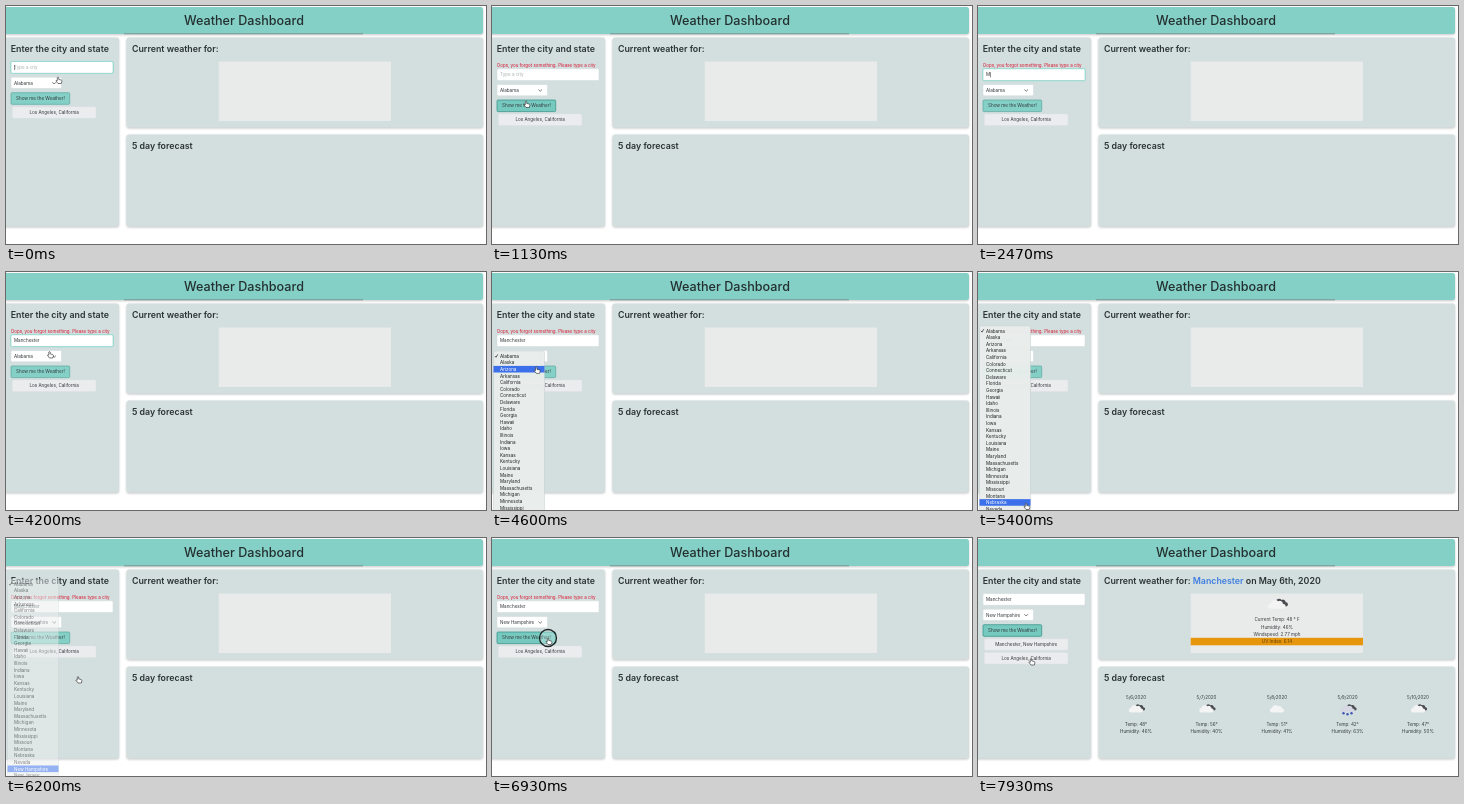
These frames come from a looping animation (480x238 px, 8 s). An HTML page:

```html
<!DOCTYPE html>
<html lang="en">
<head>
<meta charset="utf-8">
<title>Weather Dashboard</title>
<style>
  html, body { margin: 0; width: 100%; height: 100%; overflow: hidden; background: #fff; }
  svg { display: block; width: 100vw; height: 100vh; }
  text { font: 4.55px Inter, "Open Sans", sans-serif; fill: #33383b; white-space: pre; }
  .h1 { font-size: 12.6px; font-weight: 500; fill: #24302f; }
  .h3 { font-size: 8.8px; font-weight: 600; fill: #2a3235; }
  .mid { text-anchor: middle; }
  .panel { fill: #d3dfde; filter: drop-shadow(0 1px 1.2px rgba(0, 0, 0, .22)); }
  .item { fill: #ebecee; stroke: #dcdfe1; stroke-width: .4; }
  .box { fill: #fff; stroke: #cfd6d8; stroke-width: .5; }
</style>
</head>
<body>
<svg id="stage" viewBox="0 0 480 238" preserveAspectRatio="none"></svg>
<script>
const LOOP = 8000, ROW = 6.6, SHIFT = 7.3;
const states = ("Alabama,Alaska,Arizona,Arkansas,California,Colorado,Connecticut,Delaware,Florida,Georgia," +
  "Hawaii,Idaho,Illinois,Indiana,Iowa,Kansas,Kentucky,Louisiana,Maine,Maryland,Massachusetts,Michigan," +
  "Minnesota,Mississippi,Missouri,Montana,Nebraska,Nevada,New Hampshire,New Jersey").split(",");
const days = [["5/6/2020", "48°", 46], ["5/7/2020", "56°", 40], ["5/8/2020", "51°", 41],
  ["5/9/2020", "42°", 63], ["5/10/2020", "47°", 50]];

const text = (x, y, s, cls = "", extra = "") => `<text x="${x}" y="${y}" class="${cls}" ${extra}>${s}</text>`;
const rect = (x, y, w, h, extra = "", r = 1.4) => `<rect x="${x}" y="${y}" width="${w}" height="${h}" rx="${r}" ${extra}/>`;
const panel = (x, y, w, h, extra = "") => rect(x, y, w, h, `class="panel" ${extra}`, 2.5);
const puff = fill => `<path fill="${fill}" d="M-5 3.5a2.2 2.2 0 0 1 0-4.4a3.4 3.4 0 0 1 6-1.8a2.6 2.6 0 0 1 4 2.2a2 2 0 0 1 .4 4z"/>`;

function cloud(x, y, kind, k = 1) {
  const back = kind === "light" ? "" : `<g transform="translate(3 -1.4) scale(.85)">${puff("#4a4c50")}</g>`;
  const drops = kind === "rain"
    ? [-4, 0, 4].map((dx, i) => `<circle cx="${dx}" cy="${4.2 + i % 2}" r="1.2" fill="#3f57b5"/>`).join("") : "";
  return `<g transform="translate(${x} ${y}) scale(${k})">${back}${puff(kind === "rain" ? "#d5d8e2" : "#f4f4f4")}${drops}</g>`;
}

const forecast = days.map(([date, temp, hum], i) => {
  const x = 158 + i * 70.5;
  return text(x, 160.7, date, "mid") + cloud(x, 171, ["dark", "dark", "light", "rain", "dark"][i]) +
    text(x, 187.6, "Temp: " + temp, "mid") + text(x, 194.7, `Humidity: ${hum}%`, "mid");
}).join("");

const stage = document.getElementById("stage");
stage.innerHTML =
  panel(-3, 1, 480, 27, 'style="fill:#84d0c7"') +
  rect(118, 27.2, 239, 1.1, 'fill="#7c9c99"', 0) +
  text(238, 19.4, "Weather Dashboard", "h1 mid") +
  panel(-3, 31.5, 116, 189) + panel(120.5, 31.5, 356.5, 90) + panel(120.5, 128.5, 356.5, 92) +
  text(4.8, 46.2, "Enter the city and state", "h3") +
  text(126, 46.2, 'Current weather for:<tspan id="place"> <tspan fill="#3f7de0">Manchester</tspan> on May 6th, 2020</tspan>', "h3") +
  text(126, 143.3, "5 day forecast", "h3") +
  rect(212.7, 55.5, 172.3, 59.5, 'fill="#e9eaea"', 0) +
  '<g id="result">' + cloud(299, 66.5, "dark", 1.2) +
    text(299, 83.4, "Current Temp: 48 ° F", "mid") + text(299, 90.6, "Humidity: 46%", "mid") +
    text(299, 97.9, "Windspeed: 2.77 mph", "mid") + rect(212.7, 99.8, 172.3, 7.5, 'fill="#e6960c"', 0) +
    text(299, 105.2, "UV Index: 6.14", "mid", 'style="fill:#5f3c08"') + forecast + "</g>" +
  text(4.8, 60.9, "Oops, you forgot something. Please type a city", "", 'id="error" style="fill:#d8142f;font-size:4.48px"') +
  '<g id="form">' +
    rect(4.3, 54.8, 103.4, 13.2, 'id="glow" fill="#a5e0d8"', 1.8) +
    rect(5, 55.5, 102, 11.8, 'id="input" class="box"') +
    text(8, 63.1, "", "", 'id="city"') + rect(8, 58.9, .5, 5.2, 'id="caret" fill="#222"', 0) +
    rect(5, 71.2, 50.5, 11.3, 'class="box"') + text(8, 78.6, "", "", 'id="state"') +
    '<path d="M46.4 76.2l1.8 1.8l1.8-1.8" fill="none" stroke="#444" stroke-width=".7"/>' +
    rect(5, 86.7, 58.7, 11.6, 'id="button" stroke-width=".7"', 1) +
    text(34.4, 94.2, "Show me the Weather!", "mid") +
    '<g id="added">' + rect(6.3, 100.7, 83.7, 11.6, 'class="item"') + text(48.2, 108.1, "Manchester, New Hampshire", "mid") + "</g>" +
    '<g id="saved">' + rect(6.3, 100.7, 83.7, 11.6, 'class="item"') + text(48.2, 108.1, "Los Angeles, California", "mid") + "</g></g>" +
  '<g id="menu">' + rect(1.5, 79, 51, 210, 'fill="#e9eeed" fill-opacity=".97" stroke="#bcc5c4" stroke-width=".4"', 1.5) +
    rect(1.5, 0, 51, ROW, 'id="mark" fill="#3b70ea"', 0) +
    '<path d="M3 84l1 1.3l1.8-3" fill="none" stroke="#222" stroke-width=".7"/>' +
    states.map((s, i) => text(8, 85.7 + i * ROW, s, "", 'style="fill:#202424"')).join("") + "</g>" +
  '<circle id="ring" r="8.5" fill="#fff" fill-opacity=".25" stroke="#1c2424" stroke-width="1.3"/>' +
  '<path id="hand" fill="#fff" stroke="#222" stroke-width=".6" stroke-linejoin="round" d="M-.7 .5q.7-1 1.4 0v1.9l2.6.7q.8.3.6 1.2l-.6 2.2h-3.3l-2-2.6q-.1-.9 1.3-.2z"/>' +
  '<path id="beam" fill="none" stroke="#222" stroke-width=".6" d="M-1-2.5h2M0-2.5v5M-1 2.5h2"/>';

const el = {};
stage.querySelectorAll("[id]").forEach(e => el[e.id] = e);
const rows = [...el.menu.querySelectorAll("text")];

const path = [[70, 52, 71], [330, 34, 95], [1130, 34, 95], [1470, 52, 72], [3930, 52, 72], [4200, 43.5, 79.5],
  [4530, 44, 83], [4930, 47, 225.5], [5030, 47, 225.5], [5130, 48, 231], [5830, 48, 231], [6200, 72, 138.5],
  [6470, 72, 125], [6800, 56, 100], [7600, 56, 100], [7900, 53, 120.5]];
const keys = [2470, 2600, 2730, 2870, 2930, 3070, 3200, 3270, 3400, 3530];
const clicks = [[300, 530], [1440, 1600], [4270, 4470], [5670, 5830], [6800, 7070]];

const clamp = v => Math.max(0, Math.min(1, v));
const within = (t, a, b) => t >= a && t < b;
const show = (e, on) => e.style.display = on ? "" : "none";
const move = (e, x, y) => e.setAttribute("transform", `translate(${x} ${y})`);

function pointer(t) {
  const i = path.findIndex(p => p[0] > t);
  if (i === 0) return path[0].slice(1);
  if (i < 0) return path[path.length - 1].slice(1);
  const [a, x, y] = path[i - 1], [b, u, v] = path[i];
  const k = (t - a) / (b - a), e = k * k * (3 - 2 * k);
  return [x + (u - x) * e, y + (v - y) * e];
}

function draw(t) {
  const [x, y] = pointer(t);
  const error = within(t, 470, 7130), done = t >= 7130;
  const focus = t < 470 || within(t, 1530, 4400);
  const typed = keys.filter(k => t >= k).length;

  show(el.error, error);
  show(el.place, done);
  show(el.result, done);
  show(el.added, done);
  move(el.form, 0, error ? SHIFT : 0);
  move(el.saved, 0, done ? 13.8 : 0);

  show(el.glow, focus);
  el.input.style.stroke = focus ? "#6cc5ba" : "#cfd6d8";
  el.city.textContent = typed ? "Manchester".slice(0, typed) : "Type a city";
  el.city.style.fill = typed ? "#33383b" : "#a9b0b2";
  show(el.caret, t < 470 || within(t, 1530, 2070) || within(t, 2470, 4060));
  el.caret.setAttribute("x", typed ? 8 + el.city.getComputedTextLength() : 8);
  el.state.textContent = states[t < 5900 ? 0 : 28];

  const pressed = within(t, 200, 1200) || t >= 6730;
  el.button.setAttribute("fill", pressed ? "#76c9bf" : "#84d0c7");
  el.button.setAttribute("stroke", pressed ? "#2f8f85" : "#5aa79e");

  const scroll = -38 * clamp((t - 5070) / 500);
  const row = t >= 5600 ? 28 : Math.max(0, Math.min(28, Math.floor((y - 80.7 - scroll) / ROW)));
  show(el.menu, within(t, 4470, 6400));
  el.menu.style.opacity = 1 - clamp((t - 6050) / 330);
  move(el.menu, 0, scroll);
  el.mark.setAttribute("y", 80.7 + row * ROW);
  rows.forEach((r, i) => r.style.fill = i === row ? "#fff" : "#202424");

  const visible = !within(t, 2470, 3930);
  const beam = within(t, 1330, 4060);
  show(el.hand, visible && !beam);
  show(el.beam, visible && beam);
  show(el.ring, clicks.some(([a, b]) => within(t, a, b)));
  for (const e of [el.hand, el.beam, el.ring]) move(e, x, y);
}

function tick() {
  draw(performance.now() % LOOP);
  requestAnimationFrame(tick);
}
tick();
</script>
</body>
</html>
```
